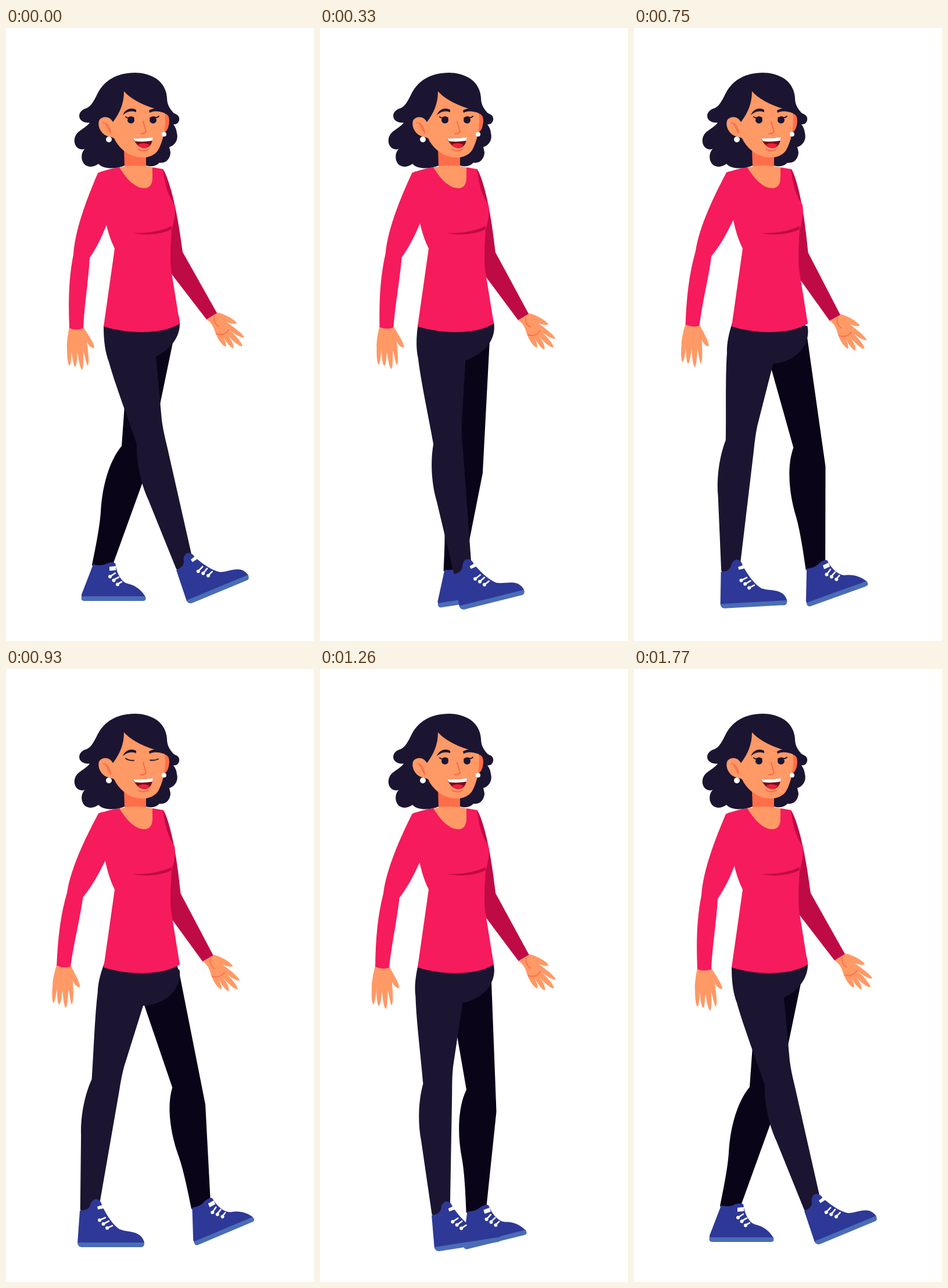
An HTML page that plays this animation: 530 px wide and 1056 px high, repeating every 1800 ms.

```html
<!DOCTYPE html>
<html lang="en">
<head>
<meta charset="utf-8">
<title>Walking woman</title>
<style>
  html, body { margin: 0; width: 100%; height: 100%; overflow: hidden; background: #fff; }
  svg { display: block; width: 100%; height: 100%; }
  .ink { fill: #1b1532; }
  .shade { fill: #0a0419; }
  .skin { fill: #ff9966; }
  .blush { fill: #ff6e4a; }
  .top { fill: #f61b5c; }
  .fold { fill: #bf0b45; }
  .shoe { fill: #2e3897; }
  .sole { fill: #4a6db6; }
  .white { fill: #fff; }
  .line { fill: none; stroke: #fa6a48; stroke-width: 2; stroke-linecap: round; stroke-linejoin: round; }
  .lash { fill: none; stroke: #1b1532; stroke-width: 1.8; stroke-linecap: round; }
  .lace { fill: none; stroke: #fff; stroke-width: 2.6; stroke-linecap: round; }
</style>
</head>
<body>
<svg viewBox="0 0 530 1056">
  <g id="farArm">
    <path class="skin" d="M363 490C375 492 392 501 397 508C395 512 385 508 380 507C390 514 406 525 410 533C405 535 390 525 385 521C394 528 406 542 407 548C402 550 388 537 381 529C387 536 393 546 391 552C385 550 380 541 374 534C378 540 380 547 378 549C370 546 362 532 358 518Q353 506 345 502Z"/>
    <path class="line" style="stroke-width:1.5" d="M358 497Q357 509 366 514M362 527Q376 531 383 520"/>
    <path class="fold" d="M270 243C277 253 286 283 291 308C297 335 301 365 304 386L363 491L345 502L285 424L262 380V260Z"/>
  </g>

  <g id="farLeg">
    <path class="shade" d="M204 500H291L287 542L240 769L184 924L180 935H155L148 925C153 900 161 862 163 834C165 790 178 745 199 720L210 566Z"/>
    <path class="shoe" d="M150 924Q165 928 174 922Q184 919 188 922L190 932C194 946 201 955 209 957C223 960 234 969 240 980H130L130 976Z"/>
    <path class="sole" d="M130 979H240Q242 987 236 987H134Q128 986 130 979Z"/>
    <path class="white" d="M178 928L189 927V934L178 935Z"/>
    <path class="lace" d="M179 945L188 939M185 951L194 946M192 958L199 954"/>
    <g class="white"><circle cx="179" cy="945" r="3"/><circle cx="185.500" cy="951.500" r="3"/><circle cx="192" cy="958.500" r="3"/></g>
  </g>

  <g id="nearLeg">
    <path class="ink" d="M176 490L168 514C168 540 171 560 177 575C187 612 211 675 225 717C224 745 231 783 245 813L293 932L303 938L320 922L319 906L277 720Q270 692 268 675L258 566C285 553 299 531 299 510Q299 496 292 485Z"/>
    <g transform="rotate(-22.6 212 518)">
      <path class="shoe" d="M127 933Q140 933 144 926Q147 914 155 913Q163 914 165 924C172 939 183 957 195 965C207 970 221 968 231 976Q237 982 238 989H123Z"/>
      <path class="sole" d="M123 988H238Q238 996 233 996H130Q123 995 123 988Z"/>
      <path class="white" d="M157 926L167 923L169 929L158 931Z"/>
      <path class="lace" d="M161 949.500L171 945M167.500 956L177 951M174 963L183 959"/>
      <g class="white"><circle cx="161" cy="949.500" r="3"/><circle cx="167.500" cy="956" r="3"/><circle cx="174" cy="963" r="3"/></g>
    </g>
  </g>

  <path class="top" d="M158 250Q174 243 195 240H252L270 243C274 268 276 284 290 305Q293 320 285 348C283 380 282 405 285 422L299 509C268 529 208 527 168 514L187 380C180 366 175 350 172 336L166 300Z"/>
  <path class="fold" d="M219 353C245 354 270 349 285 341L284.500 347C265 356 240 358 219 353Z"/>

  <g id="nearArm">
    <path class="skin" d="M109 515C106 530 104 545 105 553C105 565 106 578 109 582C112 580 112 570 113 557C114 568 116 582 119 584C122 582 122 569 123 559C125 571 127 585 131 589C134 585 133 570 133 557C136 565 138 580 141 582C144 575 141 555 139 541C143 548 148 552 152 551C152 543 142 530 133 515Z"/>
    <path class="top" d="M158 250C143 285 119 344 116 390C108 430 107 470 109 517Q121 522 133 517C135 475 142 435 144 396C157 377 166 357 173 339L190 300L186 254Q172 242 158 250Z"/>
  </g>

  <path class="ink" d="M222 77C190 77 169 91 158 112C151 126 147 134 139 138C128 141 124 149 127 156C131 163 139 163 144 163C140 169 132 173 126 178C116 185 114 202 126 208C130 210 134 209 136 208C128 215 128 231 138 237C146 241 153 238 159 234C168 244 190 243 204 237H241C251 240 260 237 264 232C276 234 283 224 283 214L281 205C291 202 297 192 294 181Q293 172 288 166C295 167 299 161 298 155C297 149 292 149 288 146C282 139 277 132 277 120C275 91 249 77 222 77Z"/>
  <path class="skin" d="M204 205V239L195 240C207 260 222 276 238 276C248 276 252 268 252 258V240L241 238V205Z"/>
  <path class="blush" d="M203 208L204 238Q222 236 241 238V208Z"/>
  <path class="blush" d="M272 147Q281 148 281 160Q280 177 271 181Z"/>
  <path class="skin" d="M203 109C215 123 241 137 273 143C276 165 272 192 262 210C254 222 240 225 225 222C209 219 194 207 186 190Q183 188 177 187C164 184 157 170 160 160C163 152 178 150 184 162C196 146 203 130 203 109Z"/>
  <path class="line" style="stroke-width:1.700" d="M167 163Q178 164 180 181M171 164Q175 172 180 181"/>
  <circle class="white" cx="177" cy="192" r="5"/>
  <circle class="white" cx="272" cy="183" r="4"/>

  <path class="ink" d="M201 150C205 140 215 136 224 141V145C214 142 208 144 201 150ZM246 142C254 137 262 138 274 142V147C264 143 256 142 247 146Z"/>
  <g id="openEyes">
    <circle class="ink" cx="215" cy="158.500" r="6"/><circle class="ink" cx="253" cy="158.500" r="6"/>
    <path class="lash" d="M206 153Q209 156 212 154Q216 152 220 155M248 155Q253 152 257 154Q260 155 263 152"/>
  </g>
  <g id="shutEyes">
    <path class="lash" d="M206 154Q211 158 220 157.500M248 157Q256 158 262 155"/>
  </g>
  <path class="line" d="M236 161L241 179Q237 183 232 182"/>
  <path fill="#7b0b16" d="M219 190Q236 191 253 188Q251 207 237 207Q225 205 219 190Z"/>
  <path fill="#f01f3b" d="M227 201Q236 196 247 201Q243 207 237 207Q231 206 227 201Z"/>
  <path class="white" d="M219 190Q236 191 253 188L252 194Q236 197 222 195Z"/>
  <path class="line" d="M227 209Q236 214 245 209"/>
</svg>
<script>
const LOOP = 1800, STEP = 30;
const part = id => document.getElementById(id);
const turn = (id, angle, x, y) =>
  part(id).setAttribute('transform', `rotate(${angle} ${x} ${y})`);
// Rises evenly from 0 to 1 at peak, then falls back to 0 at end.
const swing = (t, peak, end) =>
  t < peak ? t / peak : Math.max(0, (end - t) / (end - peak));
const ease = u => (1 - Math.cos(Math.PI * u)) / 2;

function draw(now) {
  const t = Math.floor(now % LOOP / STEP) * STEP;
  const stride = swing(t, 900, 1770);
  turn('nearLeg', 23.4 * stride, 212, 518);
  turn('farLeg', -23.7 * stride, 245, 505);
  turn('nearArm', 5 * ease(stride), 174, 263);
  turn('farArm', 2.1 * swing(t, 710, 1620), 275, 262);
  const blink = t >= 870 && t < 1020;
  part('openEyes').style.display = blink ? 'none' : '';
  part('shutEyes').style.display = blink ? '' : 'none';
}

const start = performance.now();
function tick() {
  draw(performance.now() - start);
  requestAnimationFrame(tick);
}
tick();
</script>
</body>
</html>
```
